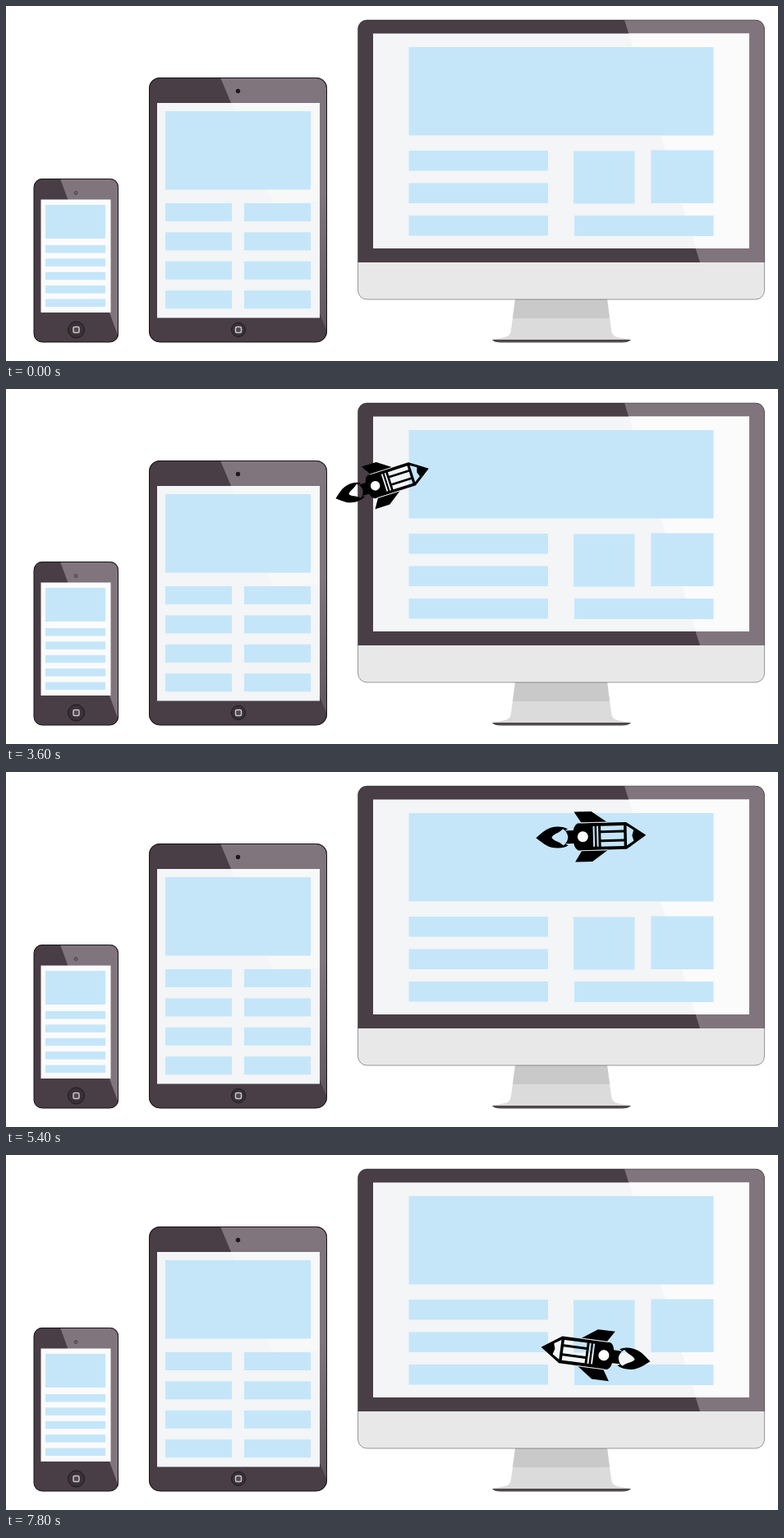
Write an HTML page that moves like this. It is 940 px wide and 432 px high and loops after 8 s.

```html
<!DOCTYPE html>
<html lang="en">
<head>
<meta charset="utf-8">
<title>Rocket across devices</title>
<style>
html, body { margin: 0; width: 100%; height: 100%; overflow: hidden; background: #fff; }
svg { display: block; width: 100vw; height: 100vh; }
.case { fill: #493e46; }
.shine { fill: #81757d; }
.edge { fill: none; stroke: #171316; stroke-width: 1; }
.screen { fill: #f3f5f7; }
.glow { fill: #fbfbfb; }
.blocks { fill: #c5e6f9; }
</style>
</head>
<body>
<svg viewBox="0 0 940 432" xmlns="http://www.w3.org/2000/svg">
  <defs>
    <linearGradient id="fade" x1="0" y1="0" x2="0" y2="1">
      <stop offset=".45" stop-color="#81757d"/>
      <stop offset="1" stop-color="#62565e"/>
    </linearGradient>
    <clipPath id="phoneClip"><rect x="34" y="210" width="103" height="199" rx="10"/></clipPath>
    <clipPath id="tabletClip"><rect x="174" y="87" width="217" height="322" rx="13"/></clipPath>
    <clipPath id="deskClip"><rect x="428.500" y="17" width="495" height="340" rx="11"/></clipPath>
  </defs>

  <g clip-path="url(#phoneClip)">
    <path class="case" d="M34 210h103v199h-103z"/>
    <path class="shine" d="M66 210H137V403z"/>
    <path class="glow" d="M42.500 235.500h85v137.500h-85z"/>
  </g>
  <rect class="edge" x="34" y="210.500" width="102.500" height="198.500" rx="10"/>
  <circle cx="85" cy="227.500" r="2" fill="#6d6169" stroke="#51464e"/>

  <g clip-path="url(#tabletClip)">
    <path class="case" d="M174 87h217v322h-217z"/>
    <path fill="url(#fade)" d="M261 87H391V396z"/>
    <path class="screen" d="M184 118h198v261.500h-198z"/>
    <path class="glow" d="M274 118H382V238L325 240z" opacity=".6"/>
  </g>
  <rect class="edge" x="174.500" y="87.500" width="216" height="321.500" rx="13"/>
  <circle cx="282.500" cy="103.500" r="2.700" fill="#1e191d"/>

  <path fill="#dcdbdb" d="M620 357H732L737 394Q738 402 744 403L760 406H592L608 403Q614 402 615 394z"/>
  <path fill="#cac9c9" d="M620 357H732L735 380H617z"/>
  <path fill="#4e494c" d="M592 406H761Q758 409.500 750 409.500H603Q594 409.500 592 406z"/>
  <g clip-path="url(#deskClip)">
    <path class="case" d="M428 17h496v295h-496z"/>
    <path class="shine" d="M753 17H924V312H845z"/>
    <path fill="#e8e8e8" d="M428 312h496V357h-496z"/>
    <path class="screen" d="M447 33.500h458v261.500h-458z"/>
    <path class="glow" d="M758.300 33.500H905V295H840z"/>
  </g>
  <rect class="edge" x="428.500" y="17" width="495" height="340" rx="11" opacity=".4"/>

  <g class="blocks" id="blocks"></g>
  <g id="buttons"></g>

  <g id="rocket">
    <path fill-rule="evenodd" d="M-67 0C-57 -8 -52 -13 -40 -13Q-33 -13 -28 -10Q-34 -7 -28 -8H-21V8H-28Q-34 7 -28 10Q-33 13 -40 13C-52 13 -57 8 -67 0z
      M-48 0C-45 -5 -40 -4 -34 -10Q-29 -7 -28 0Q-29 7 -34 10C-40 4 -45 5 -48 0z"/>
    <path d="M-20 -30.500H1L20 -17H-11.500zM-20 30.500H1L20 17H-11.500z"/>
    <path fill-rule="evenodd" d="M-16 -16.500H43L67 0L43 16.500H-16Q-22 14 -22 0Q-22 -14 -16 -16.500z
      M2.500 -12.500h2v25h-2zM7 -12.500h2v25h-2z
      M12 -12.500H40V-7H12zM12 -4H40V4H12zM12 7H40V12.500H12z
      M43.500 -12L52 -6.500L50 0L52 6.500L43.500 12z"/>
    <path fill="none" stroke="#fff" stroke-width=".8" d="M-12 -17H20M-12 17H20"/>
    <circle r="6.500" cx="-10" fill="#fff"/>
  </g>
</svg>
<script>
const STEP = 300, LOOP = 8000;
const byId = id => document.getElementById(id);

const box = (x, y, w, h) => `<rect x="${x}" y="${y}" width="${w}" height="${h}"/>`;
const column = (x, y, w, h, count, pitch) =>
  Array.from({ length: count }, (_, i) => box(x, y + i * pitch, w, h)).join("");

byId("blocks").innerHTML =
  box(48, 242, 73, 41) + column(48, 291, 73, 9.5, 5, 16.4) +
  box(194, 128, 177, 95.5) +
  column(194, 240, 81, 22, 4, 35.4) + column(290, 240, 81, 22, 4, 35.4) +
  box(490.5, 50, 371, 107.5) + column(490.5, 176, 169.5, 24.5, 3, 39.5) +
  box(691, 176.5, 74.5, 64) + box(785.5, 175.5, 76, 64.5) + box(692, 255, 169.5, 25);

const button = (x, y, r) =>
  `<circle cx="${x}" cy="${y}" r="${r}" fill="#393136" stroke="#1f1a1d"/>
   <rect x="${x - 3.5}" y="${y - 3.5}" width="7" height="7" rx="1.5" fill="#51474d" stroke="#c9c4c7" stroke-width="1.5"/>`;
byId("buttons").innerHTML = button(85.5, 394, 10) + button(283, 394, 8.5);

// Bezier legs of the flight; the rocket points along the curve
const legs = [
  { from: 1, to: 9, curve: [[72, 348], [259, 211], [219, 241.6], [300, 189]] },
  { from: 9, to: 14, curve: [[300, 189], [419, 112], [580.5, 86]] },
  { from: 14, to: 21, curve: [[580.5, 86], [690, 76], [820, 78]] },
  { from: 21, to: 23, curve: [[820, 78], [885, 78], [890, 249], [834.5, 249]] },
  { from: 23, to: 26, curve: [[834.5, 249], [770, 249.3], [718, 242.5]] }
];

const mix = (a, b, u) => a + (b - a) * u;
const ramp = (v, from, to) => Math.min(1, Math.max(0, (v - from) / (to - from)));

// Halve the control points down to the tangent segment at u
function tangentAt(points, u) {
  if (points.length === 2) return points;
  const next = points.slice(1).map((p, i) =>
    [mix(points[i][0], p[0], u), mix(points[i][1], p[1], u)]);
  return tangentAt(next, u);
}

function poseAt(step) {
  const leg = legs.find(l => step <= l.to);
  const u = ramp(step, leg.from, leg.to);
  const [a, b] = tangentAt(leg.curve, u);
  return {
    x: mix(a[0], b[0], u),
    y: mix(a[1], b[1], u),
    angle: Math.atan2(b[1] - a[1], b[0] - a[0]) * 180 / Math.PI,
    scale: 0.5 + 0.22 * ramp(step, 1, 5) + 0.28 * ramp(step, 9, 14)
  };
}

const rocket = byId("rocket");

function draw(time) {
  const step = Math.floor((time % LOOP) / STEP);
  rocket.style.display = step ? "" : "none";
  if (step) {
    const { x, y, angle, scale } = poseAt(step);
    rocket.setAttribute("transform", `translate(${x} ${y}) rotate(${angle}) scale(${scale})`);
  }
}

const start = performance.now();
function tick() {
  draw(performance.now() - start);
  requestAnimationFrame(tick);
}
tick();
</script>
</body>
</html>
```
